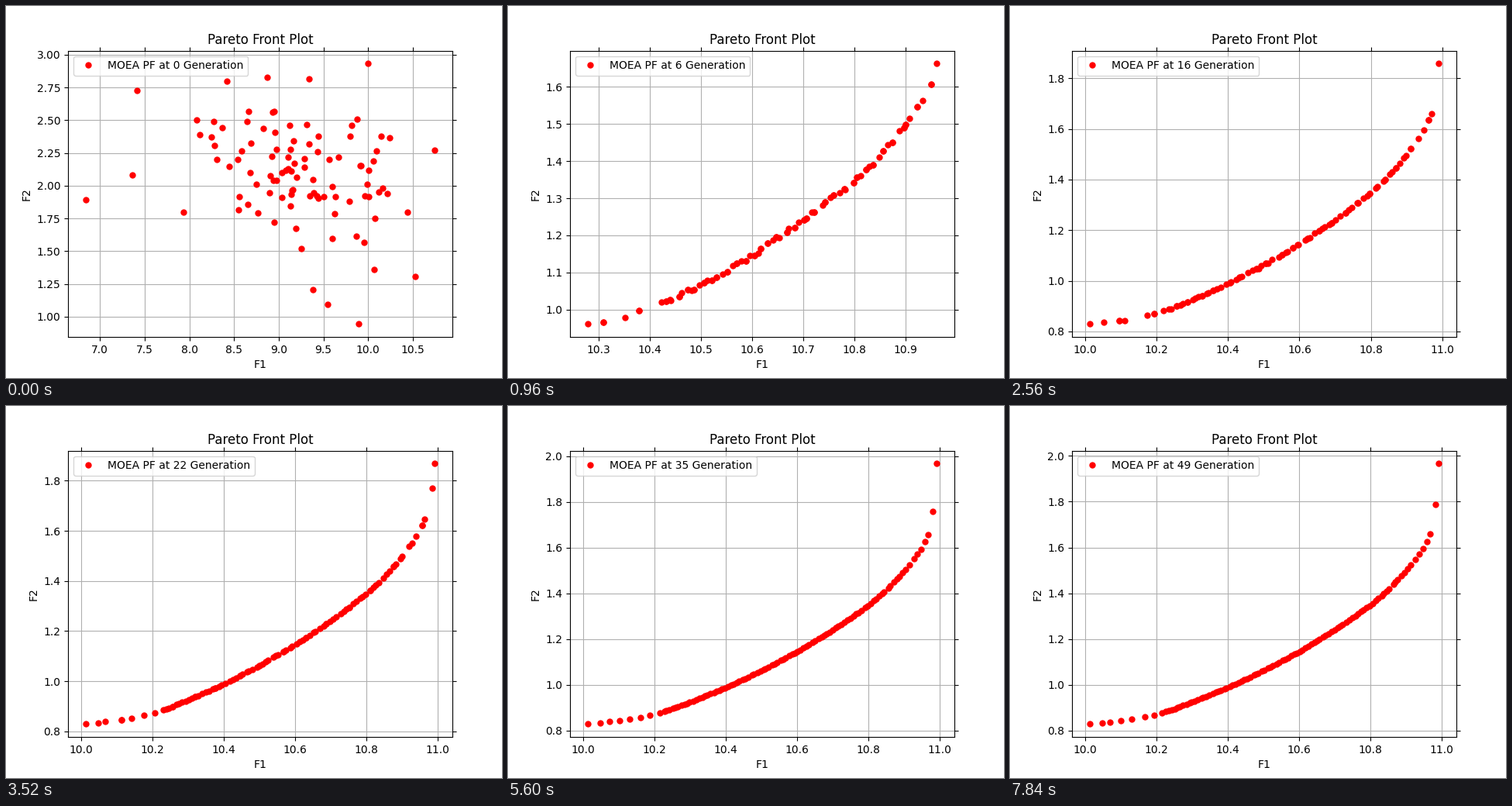
Animation, 640 px wide and 480 px high, one loop 8000 ms. Source, as a matplotlib script:

```python
import numpy as np
import matplotlib.pyplot as plt
from matplotlib.animation import FuncAnimation

GENS = 50
STEP_MS = 160
POP = 100
MERGED = 6  # generation at which the cloud has become a front

# Bends of the ideal front
FRONT_X = [10.013, 10.125, 10.19, 10.24, 10.3, 10.4, 10.5, 10.6,
           10.7, 10.8, 10.85, 10.9, 10.945, 10.975, 10.985, 10.993]
FRONT_Y = [.829, .847, .867, .889, .925, .988, 1.062, 1.145,
           1.24, 1.348, 1.415, 1.497, 1.588, 1.682, 1.808, 1.965]

# Best end points of the front, by the generation that found them
LOWS = {6: (10.278, .961), 7: (10.082, .862), 12: (10.013, .829)}
HIGHS = {6: (10.961, 1.6625), 8: (10.982, 1.845), 13: (10.99, 1.858),
         22: (10.992, 1.868), 35: (10.992, 1.968), 43: (10.992, 1.966)}

# Outermost members of the first population
RIM = [(6.838, 1.895), (7.36, 2.08), (7.41, 2.73), (7.93, 1.795),
       (8.08, 2.505), (8.42, 2.8), (8.87, 2.825), (9.34, 2.815),
       (10, 2.932), (10.24, 2.365), (10.747, 2.27), (10.44, 1.795),
       (10.525, 1.305), (10.065, 1.36), (9.89, .943), (9.55, 1.095),
       (9.38, 1.205)]

rng = np.random.default_rng(4)


def ideal(x):
    return np.interp(x, FRONT_X, FRONT_Y)


def latest(records, gen):
    return records[max(g for g in records if g <= gen)]


def first_population():
    x = rng.triangular(7.7, 9.2, 10.45, POP - len(RIM))
    mid = 2.05 - .2 * (x - 9.2)
    y = mid + rng.triangular(-.6, 0, .7, len(x))
    pts = np.vstack([RIM, np.column_stack([x, y])])
    return pts[pts[:, 1].argsort()]


def evolving_noise():
    """Offsets per member; a fifth of them is replaced in each generation."""
    noise = rng.uniform(-1, 1, (2, POP))
    history = []
    for _ in range(GENS):
        fresh = rng.random(POP) < .2
        noise = np.where(fresh, rng.uniform(-1, 1, (2, POP)), noise)
        history.append(noise)
    return history


START = first_population()
NOISE = evolving_noise()
PULL = rng.uniform(.5, 1.5, POP)


def front(gen):
    (x0, y0), (x1, y1) = latest(LOWS, gen), latest(HIGHS, gen)

    # Early fronts hold many duplicates, later ones fill every seat
    seats = int(np.interp(gen, [6, 10, 16, 30], [65, 42, 78, POP]))
    seat = np.linspace(0, seats - 1, POP).round().astype(int)
    inner = (seat > 0) & (seat < seats - 1)
    slide, rough = NOISE[gen][:, seat] * inner

    shake = np.interp(gen, [10, 30], [.6, .25])
    t = np.clip((seat + shake * slide) / (seats - 1), 0, 1)
    s = np.interp(t, [0, .07, .92, 1], [0, .21, .91, 1])  # thin at the left
    x = x0 + (x1 - x0) * s

    lift = (y0 - ideal(x0)) * (1 - s) ** 6 + (y1 - ideal(x1)) * s ** 150
    y = ideal(x) + lift + np.interp(gen, [6, 22], [.006, 0]) * rough
    return np.column_stack([x, y])


def population(gen):
    if gen >= MERGED:
        return front(gen)
    ease = 1 - (1 - gen / MERGED) ** 2
    w = (ease ** PULL)[:, None]
    return (1 - w) * START + w * front(MERGED)


fig, ax = plt.subplots(figsize=(6.4, 4.8), dpi=100)


def draw(gen):
    ax.clear()
    x, y = population(gen).T
    ax.plot(x, y, "o", color="red", markersize=5,
            label=f"MOEA PF at {gen} Generation")
    ax.set_title("Pareto Front Plot")
    ax.set_xlabel("F1")
    ax.set_ylabel("F2")
    ax.tick_params(top=True, right=True)
    ax.grid(True)
    ax.legend(loc="upper left")
    return ax.lines


anim = FuncAnimation(fig, draw, frames=GENS, interval=STEP_MS,
                     init_func=lambda: draw(0), repeat=True, repeat_delay=0)
plt.show()
```
